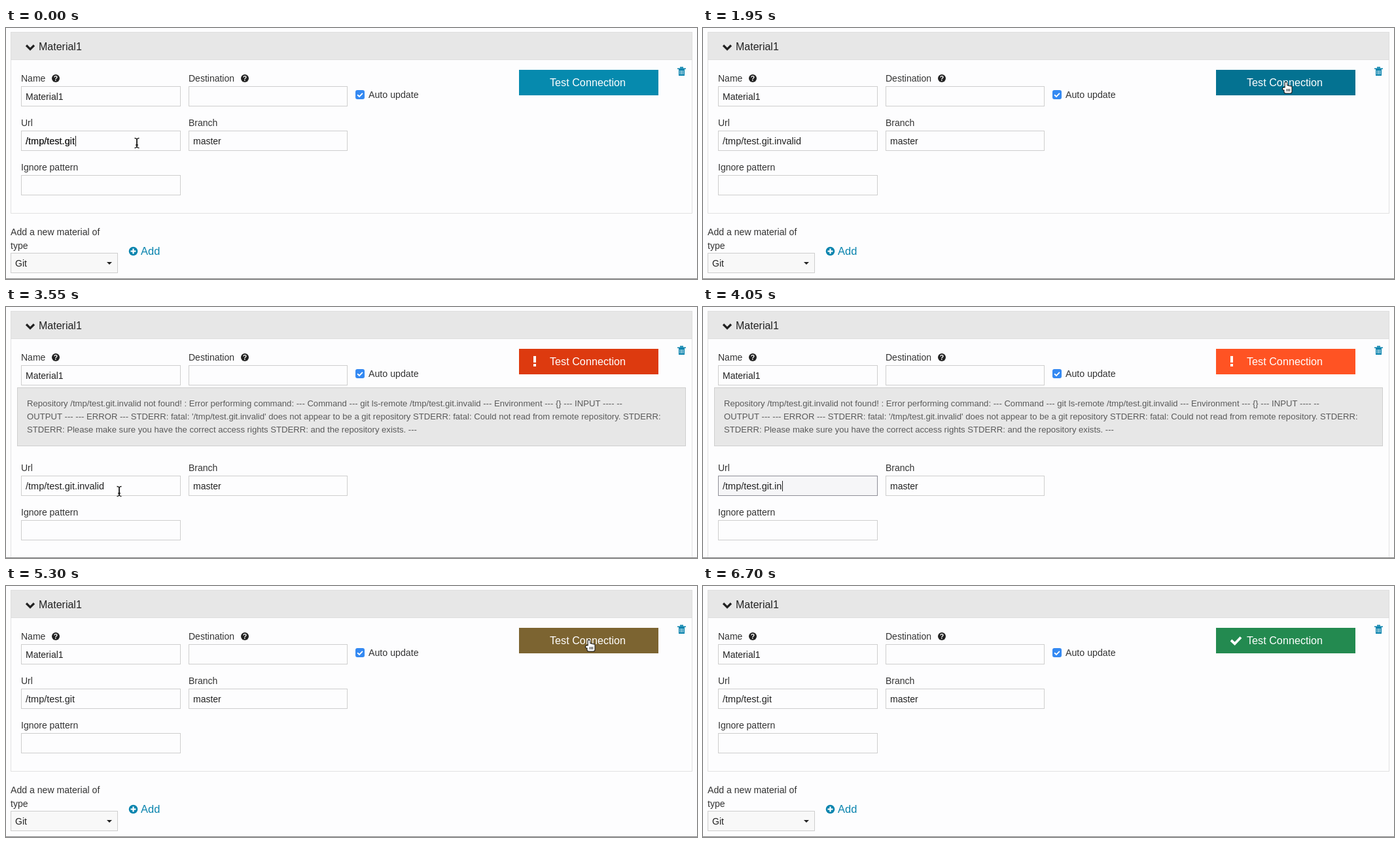
Write an HTML page with a canvas that moves like this. It is 1056 px wide and 384 px high and loops after 6750 ms.

```html
<!DOCTYPE html>
<html lang="en">
<head>
<meta charset="utf-8">
<title>Test connection</title>
<style>
  html, body { margin: 0; width: 100%; height: 100%; overflow: hidden; background: #fdfdfe; }
  canvas { display: block; }
</style>
</head>
<body>
<canvas id="stage" width="1056" height="384"></canvas>
<script>
const ctx = document.getElementById('stage').getContext('2d');
const LOOP = 6750, STEP = 50, FADE = 250;
const FONT = '"Liberation Sans", Arial, sans-serif';
const PAGE = '#fdfdfe', PANEL = '#e7e7e7', LINE = '#cecece';
const INK = '#222', LABEL = '#333', MUTED = '#5a5a5a', ACCENT = '#0a84ae';

// Button states as [r, g, b]; each change fades.
const IDLE = [6, 138, 174], HOVER = [4, 114, 145];
const FAILED = [255, 83, 35], FAILED_HOVER = [221, 58, 15], PASSED = [35, 138, 80];

// Moments of the story, in ms.
const TYPE = 150, REACH = 1610, FAIL = 2080, REFOCUS = 3600, ERASE = 3750;
const RETURN = 4900, RETRY = 5170, LEAVE = 6350;

const BUTTON = { x: 784, y: 64, w: 213, h: 40 };
const ROW = 68, COLUMNS = [23, 279], FIELD_H = 31, ERROR_SHIFT = 101;
const PATH = '/tmp/test.git', SUFFIX = '.invalid';
const ERROR_LINES = [
  'Repository /tmp/test.git.invalid not found! : Error performing command: --- Command --- git ls-remote /tmp/test.git.invalid --- Environment --- {} --- INPUT ---- --',
  "OUTPUT --- --- ERROR --- STDERR: fatal: '/tmp/test.git.invalid' does not appear to be a git repository STDERR: fatal: Could not read from remote repository. STDERR:",
  'STDERR: Please make sure you have the correct access rights STDERR: and the repository exists. ---'
];

const ramp = (t, from, length) => Math.min(1, Math.max(0, (t - from) / length));
const mix = (a, b, k) => a.map((v, i) => v + (b[i] - v) * k);
const failing = t => t >= FAIL && t < RETRY;
const inside = (x, y, r) => x >= r.x && x <= r.x + r.w && y >= r.y && y <= r.y + r.h;

function text(s, x, y, size = 14, color = LABEL, weight = '') {
  ctx.font = `${weight} ${size}px ${FONT}`;
  ctx.fillStyle = color;
  ctx.fillText(s, x, y);
}

function box(x, y, w, h, fill, border) {
  ctx.fillStyle = fill;
  ctx.fillRect(x, y, w, h);
  if (!border) return;
  ctx.strokeStyle = border;
  ctx.lineWidth = 1;
  ctx.strokeRect(x + .5, y + .5, w - 1, h - 1);
}

function disc(x, y, r, color) {
  ctx.fillStyle = color;
  ctx.beginPath();
  ctx.arc(x, y, r, 0, 7);
  ctx.fill();
}

function line(points, color, width) {
  ctx.strokeStyle = color;
  ctx.lineWidth = width;
  ctx.beginPath();
  points.forEach(p => ctx.lineTo(...p));
  ctx.stroke();
}

function tick(x, y, size, width) {
  line([[x - size, y], [x - size / 4, y + size * .7], [x + size, y - size * .6]], '#fff', width);
}

function field(label, column, row, shift = 0, value = '', size = 14) {
  const x = COLUMNS[column], y = 89 + ROW * row + shift;
  text(label, x, y - 7);
  box(x, y, 244 - column, FIELD_H, PAGE, LINE);
  text(value, x + 7, y + 21, size, INK);
}

function help(x) {
  disc(x, 77, 6, '#222');
  ctx.textAlign = 'center';
  text('?', x, 81, 10.5, '#fff', 'bold');
  ctx.textAlign = 'left';
}

function trash() {
  box(1028, 63, 9, 10, ACCENT);
  box(1026, 61.5, 13, 1.5, ACCENT);
  box(1030, 59.5, 5, 2, ACCENT);
  for (let i = 0; i < 3; i++) box(1029.6 + i * 2.4, 65, .9, 6, PAGE);
}

function urlField(t, shift) {
  const again = t >= FAIL;
  const start = again ? ERASE : TYPE, gap = again ? 75 : 115;
  const keys = Math.min(SUFFIX.length, Math.max(0, Math.floor((t - start) / gap) + 1));
  const value = PATH + SUFFIX.slice(0, again ? SUFFIX.length - keys : keys);
  const focused = again ? t >= REFOCUS && t < RETRY : t < REACH + 150;
  const y = 89 + ROW + shift, size = 14.5;
  field('Url', 0, 1, shift, value, size);
  if (!focused) return;

  ctx.globalAlpha = ramp(t, again ? REFOCUS : 0, FADE);
  box(COLUMNS[0], y, 244, FIELD_H, '#f6f6f8', '#8f8f98');
  ctx.globalAlpha = 1;
  text(value, 30, y + 21, size, INK);
  const sinceKey = Math.max(0, t - start - (SUFFIX.length - 1) * gap);
  if (sinceKey % 1000 < 500) box(Math.round(31 + ctx.measureText(value).width), y + 8, 1, 16, INK);
}

function button(t) {
  const changes = [
    [REACH, HOVER], [FAIL, FAILED_HOVER], [REFOCUS, FAILED],
    [RETURN, FAILED_HOVER], [RETRY, PASSED]
  ];
  const rgb = changes.reduce((c, [at, next]) => mix(c, next, ramp(t, at, FADE)), IDLE);
  box(BUTTON.x, BUTTON.y, BUTTON.w, 39, `rgb(${rgb.map(Math.round)})`);
  text('Test Connection', 831, 89, 16.2, '#fff');
  if (failing(t)) {
    ctx.globalAlpha = ramp(t, FAIL, 2 * FADE);
    box(806, 75, 4, 10, '#fff');
    box(806, 87, 4, 4, '#fff');
  } else if (t >= RETRY + FADE) {
    ctx.globalAlpha = ramp(t, RETRY + FADE, 2 * FADE);
    tick(814.5, 83, 7.5, 3.8);
  }
  ctx.globalAlpha = 1;
}

function panel(t, shift) {
  box(7, 6, 1042, 278 + shift, PAGE, '#e2e2e2');
  box(7, 6, 1042, 43, PANEL, '#dedede');
  line([[31, 26.5], [37, 32.5], [43, 26.5]], INK, 3.2);
  text('Material1', 50, 34, 16, INK);
  trash();

  field('Name', 0, 0, 0, 'Material1');
  field('Destination', 1, 0);
  help(76);
  help(365);
  ctx.fillStyle = '#3489f2';
  ctx.beginPath();
  ctx.roundRect(534, 95, 14, 14, 3);
  ctx.fill();
  tick(541, 102.3, 3.9, 1.9);
  text('Auto update', 554, 107, 14.2);

  urlField(t, shift);
  field('Branch', 1, 1, shift, 'master');
  field('Ignore pattern', 0, 2, shift);
  button(t);

  if (shift) {
    box(17, 123, 1022, 90, PANEL, LINE);
    ERROR_LINES.forEach((s, i) => text(s, 32, 152 + i * 20, 13.12, MUTED));
  }
}

function addRow() {
  text('Add a new material of', 7, 317, 14.1);
  text('type', 7, 338);
  box(7, 344, 164, FIELD_H, '#f8f8f8', LINE);
  text('Git', 14, 365, 14, INK);
  for (let i = 0; i < 4; i++) box(154.5 + i, 358 + i, 7 - 2 * i, 1, INK);
  disc(194.5, 341.5, 6.8, ACCENT);
  box(190.5, 340.4, 8, 2.2, '#fff');
  box(193.4, 337.5, 2.2, 8, '#fff');
  text('Add', 206, 347, 16.5, ACCENT);
}

function outlined(path, fill, edge) {
  ctx.lineWidth = 2;
  ctx.strokeStyle = edge;
  ctx.stroke(path);
  ctx.fillStyle = fill;
  ctx.fill(path);
}

function arrow() {
  outlined(new Path2D('M0 0V14.5L3.3 11.4L5.8 17L8.4 15.9L6 10.5H10.5Z'), '#0a0a0a', '#fff');
}

function hand() {
  const path = new Path2D();
  path.roundRect(-1.3, 0, 2.6, 12, 1.3);
  for (let i = 1; i < 4; i++) path.roundRect(-1.3 + i * 2.4, 4.5 + i * .6, 2.6, 8, 1.3);
  path.roundRect(-5, 8.5, 6, 3, 1.5);
  path.roundRect(-2.5, 9, 11, 7.5, 2);
  outlined(path, '#fff', '#111');
  for (let i = 0; i < 3; i++) box(.8 + i * 2.2, 10, .9, 4, '#111');
}

function beam() {
  for (const [color, width] of [['#fff', 3], ['#111', 1.3]]) {
    for (const side of [-1, 1]) {
      const bend = [[3.5, -7.5], [1.5, -7.2], [0, -6], [0, 6], [1.5, 7.2], [3.5, 7.5]];
      line(bend.map(([x, y]) => [x * side, y]), color, width);
    }
    line([[-2, 3], [2, 3]], color, width);
  }
}

// Moves from one place to the next; lift bends the path upwards.
function pointerAt(t) {
  const first = [200, 176], target = [891, 83], second = [173, 282];
  const edge = [876, 103], out = [900, -24];
  const glide = (a, b, from, length, lift = 0) => {
    const k = ramp(t, from, length), [x, y] = mix(a, b, k);
    return [x, y - lift * Math.sin(Math.PI * k)];
  };
  if (t < FAIL) return glide(first, target, 1150, REACH - 1150, 66);
  if (t < REFOCUS) return glide(target, second, 2100, 400, 15);
  if (t < RETURN) return glide(second, edge, 4400, RETURN - 4400);
  if (t < LEAVE) return glide(edge, target, RETURN, 150);
  return glide(target, out, LEAVE, 100);
}

function pointer(t, shift) {
  const typing = (t >= 100 && t < 1150) || (t >= ERASE - 50 && t < 4400);
  if (typing) return;
  const [x, y] = pointerAt(t);
  const url = { x: COLUMNS[0], y: 89 + ROW + shift, w: 244, h: FIELD_H };
  ctx.save();
  ctx.translate(x, y);
  if (inside(x, y, BUTTON)) hand();
  else if (inside(x, y, url)) beam();
  else arrow();
  ctx.restore();
}

function draw(now) {
  const t = Math.floor((now % LOOP) / STEP) * STEP;
  const shift = failing(t) ? ERROR_SHIFT : 0;
  box(0, 0, 1056, 384, PAGE);
  panel(t, shift);
  if (!shift) addRow();
  box(0, 383, 1056, 1, '#858585');
  pointer(t, shift);
}

const origin = performance.now();
function frame() {
  draw(performance.now() - origin);
  requestAnimationFrame(frame);
}
frame();
</script>
</body>
</html>
```
